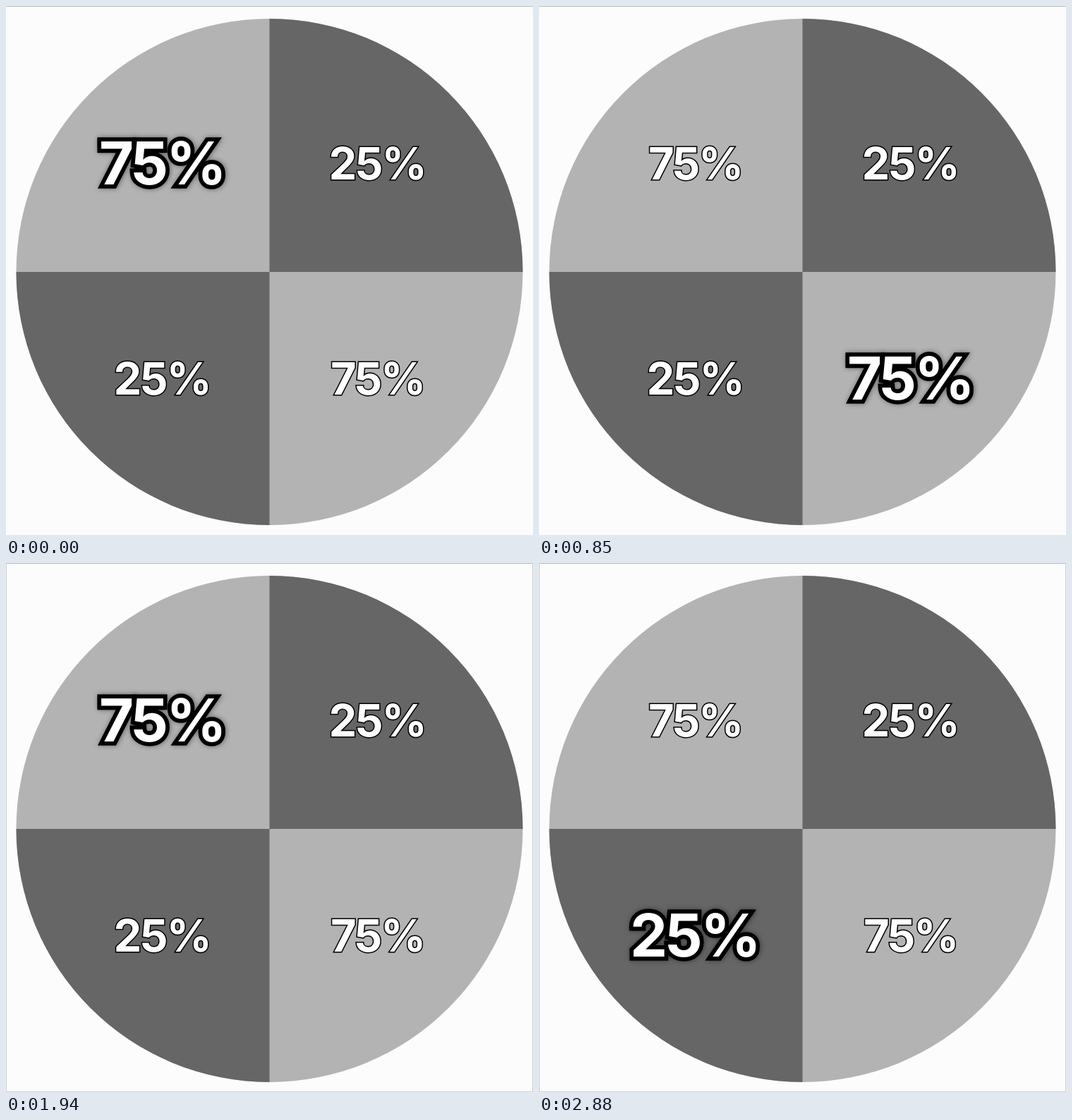
Recreate the animation shown at these times as an HTML page with a canvas. Size 747 by 750 pixels, loop 2940 ms.

```html
<!DOCTYPE html>
<html lang="en">
<head>
<meta charset="utf-8">
<title>Probability wheel</title>
<style>
  html, body { margin: 0; width: 100%; height: 100%; overflow: hidden; background: #fcfcfc; }
  canvas { display: block; }
</style>
</head>
<body>
<canvas id="stage" width="747" height="750"></canvas>
<script>
const ctx = document.getElementById('stage').getContext('2d');
const LOOP = 2940;
const LIGHT = '#b3b3b3', DARK = '#666666';
const CENTER = { x: 373.5, y: 377, r: 359 };
const TL = 0, TR = 1, BL = 2, BR = 3;
const LABELS = ['75%', '25%', '25%', '75%'];

const SMALL = { size: 63.3, line: 3, base: 245.5, x: 221 };
const BIG = { size: 84.5, line: 11.5, base: 252.8, x: 220.5 };
const TRACKING = -0.035;

// Each span: start, number of light/dark pairs, dark time per pair
const SPANS = [
  [0, 1, 30], [90, 7, 30], [610, 1, 30], [730, 4, 30], [1120, 1, 30],
  [1210, 4, 30], [1490, 1, 30], [1580, 2, 30], [1730, 3, 30], [1940, 1, 30],
  [2060, 2, 30], [2210, 1, 30], [2330, 4, 30], [2790, 1, 60]
];

// The highlight hops from a light quarter to a dark one and back
function activeQuarter(t) {
  let pairs = 0;
  for (let i = 0; i < SPANS.length; i++) {
    const [start, count, dark] = SPANS[i];
    const end = i + 1 < SPANS.length ? SPANS[i + 1][0] : LOOP;
    if (t >= end) { pairs += count; continue; }
    const period = (end - start) / count;
    const n = Math.floor((t - start) / period);
    const from = start + n * period;
    if (t >= from + period - dark) return (pairs + n) % 2 ? TR : BL;
    const lower = (from >= 610 && from < 1850) || from > 2550;
    return lower ? BR : TL;
  }
}

function drawWheel() {
  const { x, y, r } = CENTER;
  ctx.save();
  ctx.beginPath();
  ctx.arc(x, y, r, 0, Math.PI * 2);
  ctx.clip();
  ctx.fillStyle = LIGHT;
  ctx.fillRect(0, 0, 747, 750);
  ctx.fillStyle = DARK;
  ctx.fillRect(x, 0, 400, y);
  ctx.fillRect(0, y, x, 400);
  ctx.restore();
}

function drawBorder(t) {
  ctx.fillStyle = '#b8b8b8';
  ctx.fillRect(0, 0, 747, 1);
  if (t < 860) return;
  ctx.fillStyle = '#d0d0d0';
  ctx.fillRect(0, 1, 1, 749);
  ctx.fillRect(746, 1, 1, 749);
  ctx.fillRect(0, 749, 747, 1);
}

function drawLabel(quarter, active) {
  const style = active ? BIG : SMALL;
  const text = LABELS[quarter];
  ctx.save();
  ctx.font = `bold ${style.size}px Inter, "Liberation Sans", sans-serif`;
  ctx.letterSpacing = style.size * TRACKING + 'px';
  ctx.lineWidth = style.line;
  ctx.miterLimit = 4;
  ctx.strokeStyle = '#000';
  ctx.fillStyle = '#fff';
  // Center the visible ink rather than the advance width
  const m = ctx.measureText(text);
  const x = style.x + (quarter % 2) * 305
    - (m.actualBoundingBoxRight - m.actualBoundingBoxLeft) / 2;
  const y = style.base + (quarter >> 1) * 305;
  if (active) {
    ctx.shadowColor = 'rgba(0,0,0,0.45)';
    ctx.shadowBlur = 7;
    ctx.shadowOffsetX = 1;
    ctx.shadowOffsetY = 0.5;
  }
  ctx.strokeText(text, x, y);
  ctx.shadowColor = 'transparent';
  ctx.fillText(text, x, y);
  ctx.restore();
}

function draw() {
  const t = performance.now() % LOOP;
  const active = activeQuarter(t);
  ctx.fillStyle = '#fcfcfc';
  ctx.fillRect(0, 0, 747, 750);
  drawWheel();
  drawBorder(t);
  for (let q = 0; q < 4; q++) drawLabel(q, q === active);
  requestAnimationFrame(draw);
}

draw();
</script>
</body>
</html>
```
